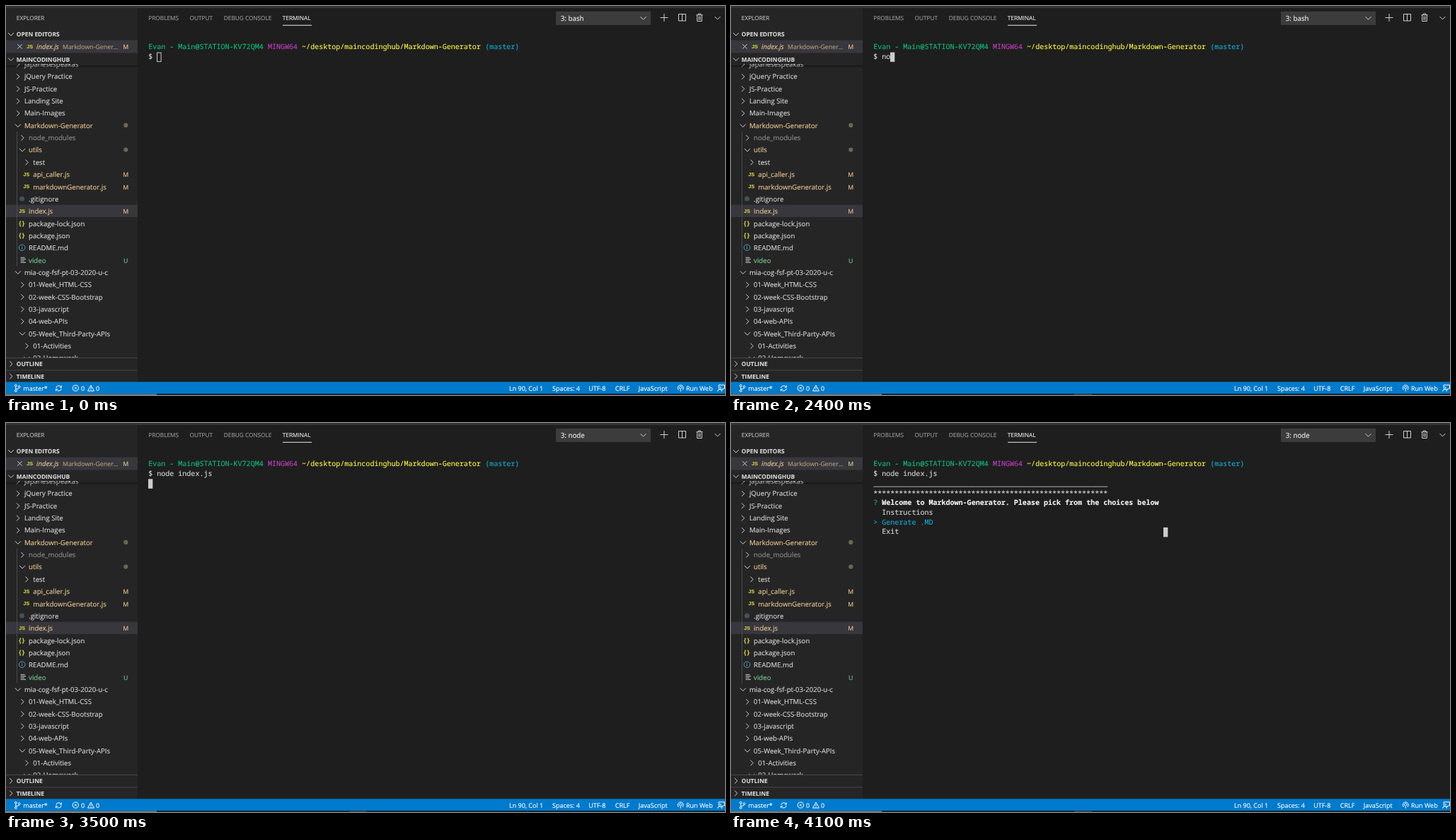
These frames come from a looping animation (1016 px wide and 551 px high, 8 s). An HTML page:

```html
<!DOCTYPE html>
<html lang="en">
<head>
<meta charset="utf-8">
<title>Terminal session</title>
<style>
  html, body { margin: 0; width: 100%; height: 100%; overflow: hidden; background: #1e1e1e; }
  svg { display: block; width: 1016px; height: 551px; }
  text { font: 9.65px "Open Sans", "Noto Sans", sans-serif; color: #d4d4d4; fill: currentColor;
    stroke: currentColor; stroke-width: .15; white-space: pre; text-rendering: geometricPrecision; }
  .cap { font-size: 8.25px; }
  .head { font-size: 8.4px; font-weight: 700; }
  .small { font-size: 8.8px; }
  .italic { font-style: italic; }
  .bar { font-size: 9px; color: #fff; }
  .pick { font-size: 9.75px; color: #f0f0f0; }
  .js { font: 700 7.2px "Liberation Sans", sans-serif; color: #cbcb41; }
  .json { font-size: 9px; font-weight: 700; color: #cbcb41; letter-spacing: 1px; }
  .term text { font: 10.04px "Noto Sans Mono", "DejaVu Sans Mono", monospace; }
  .term .bold { font-weight: 700; }
  .line { fill: none; stroke: #d0d0d0; stroke-width: 1; }
  .white { fill: none; stroke: #fff; stroke-width: 1; }
</style>
</head>
<body>
<svg id="stage" viewBox="0 0 1016 551"></svg>
<script>
const MODIFIED = '#e8c690', ADDED = '#73c991', IGNORED = '#8c8c8c', PLAIN = '#d4d4d4';
const GREEN = '#0dbc79', MAGENTA = '#bc3fbc', YELLOW = '#f5f543', CYAN = '#11a8cd', WHITE = '#f0f0f0';

const rect = (x, y, w, h, fill, extra = '') =>
  `<rect x="${x}" y="${y}" width="${w}" height="${h}" fill="${fill}" ${extra}/>`;
const path = (d, cls = 'line', extra = '') => `<path d="${d}" class="${cls}" ${extra}/>`;
const dot = (x, y, r, fill) => `<circle cx="${x}" cy="${y}" r="${r}" fill="${fill}"/>`;
const ring = (x, y, r, cls, extra = '') => `<circle cx="${x}" cy="${y}" r="${r}" class="${cls}" ${extra}/>`;
const escape = s => s.replace(/&/g, '&amp;').replace(/</g, '&lt;').replace(/>/g, '&gt;');
const text = (x, y, s, cls = '', color = '', extra = '') =>
  `<text x="${x}" y="${y}" class="${cls}" style="${color && 'color:' + color}" ${extra}>${escape(s)}</text>`;
const chevron = (x, y, open) => path(open
  ? `M${x - 4} ${y - 2}l4 4l4 -4`
  : `M${x - 1.8} ${y - 3.8}l3.8 3.8l-3.8 3.8`);

// Explorer rows: depth, kind, label, colour, badge
const tree = [
  [1, 'shut', 'japanesespeakas'],
  [1, 'shut', 'jQuery Practice'],
  [1, 'shut', 'JS-Practice'],
  [1, 'shut', 'Landing Site'],
  [1, 'shut', 'Main-Images'],
  [1, 'open', 'Markdown-Generator', MODIFIED, 'dot'],
  [2, 'shut', 'node_modules', IGNORED],
  [2, 'open', 'utils', MODIFIED, 'dot'],
  [3, 'shut', 'test'],
  [3, 'js', 'api_caller.js', MODIFIED, 'M'],
  [3, 'js', 'markdownGenerator.js', MODIFIED, 'M'],
  [2, 'git', '.gitignore'],
  [2, 'js', 'index.js', MODIFIED, 'M'],
  [2, 'json', 'package-lock.json'],
  [2, 'json', 'package.json'],
  [2, 'info', 'README.md'],
  [2, 'list', 'video', ADDED, 'U'],
  [1, 'open', 'mia-cog-fsf-pt-03-2020-u-c'],
  [2, 'shut', '01-Week_HTML-CSS'],
  [2, 'shut', '02-week-CSS-Bootstrap'],
  [2, 'shut', '03-javascript'],
  [2, 'shut', '04-web-APIs'],
  [2, 'open', '05-Week_Third-Party-APIs'],
  [3, 'shut', '01-Activities'],
  [3, 'open', '02-Homework']
];

const BLUE = 'style="stroke:#519aba"';
const icons = {
  shut: (x, y) => chevron(x - 9, y, false),
  open: (x, y) => chevron(x - 9, y, true),
  js: (x, y) => text(x - 13.8, y + 2.2, 'JS', 'js'),
  json: (x, y) => text(x - 14, y + 2.8, '{}', 'json'),
  git: (x, y) => dot(x - 9.5, y - .4, 3.5, '#41535b'),
  info: (x, y) => ring(x - 9.5, y - .6, 4.3, 'line', BLUE) +
    path(`M${x - 9.5} ${y - 1.2}v3M${x - 9.5} ${y - 3.1}v1.1`, 'line', BLUE),
  list: (x, y) => path(`M${x - 11.5} ${y - 3.8}h6m-6 2.3h7.5m-7.5 2.3h5.5m-5.5 2.3h7.5`)
};

function treeRow([depth, kind, label, color = PLAIN, badge], i) {
  const x = 19.7 + depth * 6.2, y = 82.7 + i * 17.34;
  let out = label === 'index.js' ? rect(0, y - 9.2, 186, 17.4, '#37373d') : '';
  out += icons[kind](x, y) + text(x, y + 3.4, label, '', color);
  if (badge === 'dot') out += dot(169.3, y - .5, 3.1, '#706453');
  else if (badge) out += text(169.3, y + 3.4, badge, 'small', color, 'text-anchor="middle"');
  return out;
}

const section = (y, label, open) => chevron(7, y - .3, open) + text(14.8, y + 2.9, label, 'head');

function sidebar() {
  return rect(0, 0, 186, 533, '#252526') +
    text(14.8, 20.2, 'EXPLORER', 'cap', '#bbbbbb') +
    section(40.3, 'OPEN EDITORS', true) +
    rect(0, 48.5, 186, 18, '#37373d') +
    path('M16.3 54.2l6.4 6.4m0 -6.4l-6.4 6.4') +
    text(29.3, 59.6, 'JS', 'js') +
    text(43, 60.8, 'index.js', 'italic', MODIFIED) +
    text(80, 60.8, 'Markdown-Gener…', 'small', '#b39e7c') +
    text(169.3, 60.6, 'M', 'small', MODIFIED, 'text-anchor="middle"') +
    `<g clip-path="url(#list)">${tree.map(treeRow).join('')}` +
    rect(15, 178, 1, 190.5, '#4b4b4b') + rect(0, 84, 186, 4, 'url(#shade)') + '</g>' +
    section(75.8, 'MAINCODINGHUB', true) +
    rect(0, 498, 186, 1, '#464647') + section(507.2, 'OUTLINE', false) +
    rect(0, 515.5, 186, 1, '#464647') + section(524.8, 'TIMELINE', false);
}

function panelHead() {
  const tabs = [[201.3, 'PROBLEMS'], [259.5, 'OUTPUT'], [307.8, 'DEBUG CONSOLE'], [390.8, 'TERMINAL']];
  return tabs.map(([x, s]) => text(x, 20.2, s, 'cap', s === 'TERMINAL' ? '#e7e7e7' : '#979797')).join('') +
    rect(391, 26.8, 41, 1, '#e7e7e7') +
    rect(777, 7.7, 134, 19.2, '#3c3c3c') + chevron(900.5, 17.2, true) +
    path('M924.5 16.5h11M930 11v11') +
    path('M950.5 11.5h10v9.5h-10zM955.5 11.5v9.5') +
    path('M975.5 12.7h9M978.3 12.5v-1.5h3.4v1.5M976.7 13v8.5h6.6v-8.5M979 14.5v5.3M981 14.5v5.3') +
    chevron(1005.5, 17, true);
}

function statusBar() {
  const labels = [[24.3, 'master*'], [106, '0'], [127, '0'], [711, 'Ln 90, Col 1'], [772, 'Spaces: 4'],
    [823.2, 'UTF-8'], [860.8, 'CRLF'], [893.8, 'JavaScript'], [961, 'Run Web']];
  return rect(0, 532.4, 1016, 17, '#007acc') +
    rect(0, 549.4, 1016, 1.6, '#15232c') + rect(0, 549.4, 213, 1.6, '#5f8299') +
    labels.map(([x, s]) => text(x, 545.3, s, 'bar')).join('') +
    ring(13.8, 537.8, 1.4, 'white') + ring(13.8, 545, 1.4, 'white') + ring(18.6, 539.3, 1.4, 'white') +
    path('M13.8 539.2v4.4M18.6 540.7q0 2 -4.4 2', 'white') +
    path('M70.7 541a4 4 0 0 1 7.3 -1.3M78.3 541.8a4 4 0 0 1 -7.4 1.4M78.4 537.6v2.6h-2.6M70.5 545.4v-2.6h2.6', 'white') +
    ring(98.3, 541.2, 4.1, 'white') + path('M96.7 539.6l3.2 3.2m0 -3.2l-3.2 3.2', 'white') +
    path('M120 537.2l4.4 8h-8.8zM120 539.8v2.8M120 543.3v1', 'white') +
    path('M950.6 544a4 4 0 1 1 5.2 0M951.6 542a2 2 0 1 1 3.2 0M953.2 541v5', 'white') +
    path('M1007 539.5v-2.6h8.5v5h-1.8l-1.8 2v-2', 'white') +
    ring(1008.6, 541, 1.5, 'white') + path('M1005.6 546q0 -3 3 -3t3 3', 'white');
}

document.getElementById('stage').innerHTML =
  `<defs><clipPath id="list"><rect x="0" y="82" width="186" height="416"/></clipPath>
   <linearGradient id="shade" x2="0" y2="1"><stop stop-color="#000" stop-opacity=".4"/>
   <stop offset="1" stop-color="#000" stop-opacity="0"/></linearGradient></defs>` +
  rect(0, 0, 1016, 551, '#1e1e1e') + sidebar() + panelHead() +
  rect(0, 0, 1016, 3, '#333334') + statusBar() +
  '<g id="live"></g>';

// Terminal grid
const CELL = 6.025, LEFT = 201.2, LINE = 13.72, BASE = 61.4;
const put = (col, row, s, color = PLAIN, cls = '') => text(LEFT + col * CELL, BASE + row * LINE, s, cls, color);
const block = (col, row, hollow) => {
  const x = Math.round(LEFT + col * CELL), y = BASE + row * LINE - 9.5;
  return hollow
    ? rect(x + .5, y + .5, 5.6, 12.6, 'none', 'stroke="#cccccc"')
    : rect(x, y, 6.3, 13.5, '#cccccc');
};

const COMMAND = 'node index.js';
const CHOICES = ['Instructions', 'Generate .MD', 'Exit'];
const keys = [[0, 0], [1800, 1], [2400, 2], [2600, 3], [2700, 5], [2800, 6], [2900, 8],
  [3000, 10], [3200, 11], [3300, 13]];
const ENTER = 3400, RETITLE = 3500, BANNER = 3700, MENU = 4000, ARROW = 4100;

function menu(chosen) {
  let out = put(0, 4, '?', GREEN) +
    put(2, 4, 'Welcome to Markdown-Generator. Please pick from the choices below', WHITE, 'bold');
  if (!chosen) out += put(68, 4, '(Use arrow keys)', '#8a8a8a');
  CHOICES.forEach((s, i) => {
    if (i === chosen) out += put(0, 5 + i, '>', CYAN);
    out += put(2, 5 + i, s, i === chosen ? CYAN : PLAIN);
  });
  return out;
}

function cursor(t, typed) {
  if (t >= MENU) return block(t >= ARROW ? 68 : 84, 7);
  if (t >= BANNER) return block(55, 3);
  if (t >= ENTER) return block(0, 2);
  return block(2 + typed, 1, t < 100);
}

function scene(t) {
  const typed = keys.filter(k => k[0] <= t).pop()[1];
  let out = put(0, 0, 'Evan - Main@STATION-KV72QM4', GREEN) + put(28, 0, 'MINGW64', MAGENTA) +
    put(36, 0, '~/desktop/maincodinghub/Markdown-Generator', YELLOW) + put(79, 0, '(master)', CYAN) +
    put(0, 1, '$ ' + COMMAND.slice(0, typed));
  if (t >= BANNER) out += put(0, 2, '_'.repeat(55)) + put(0, 3, '*'.repeat(55));
  if (t >= MENU) out += menu(t >= ARROW ? 1 : 0);
  return `<g class="term">${out}${cursor(t, typed)}</g>` +
    text(783.8, 20.6, t >= RETITLE ? '3: node' : '3: bash', 'pick') +
    (t >= 1700 ? rect(485, 549.6, 25, 1.4, '#3d4a52') : '');
}

const live = document.getElementById('live');
const start = performance.now();
let shown = '';
function tick() {
  const next = scene((performance.now() - start) % 8000);
  if (next !== shown) live.innerHTML = shown = next;
  requestAnimationFrame(tick);
}
tick();
</script>
</body>
</html>
```
